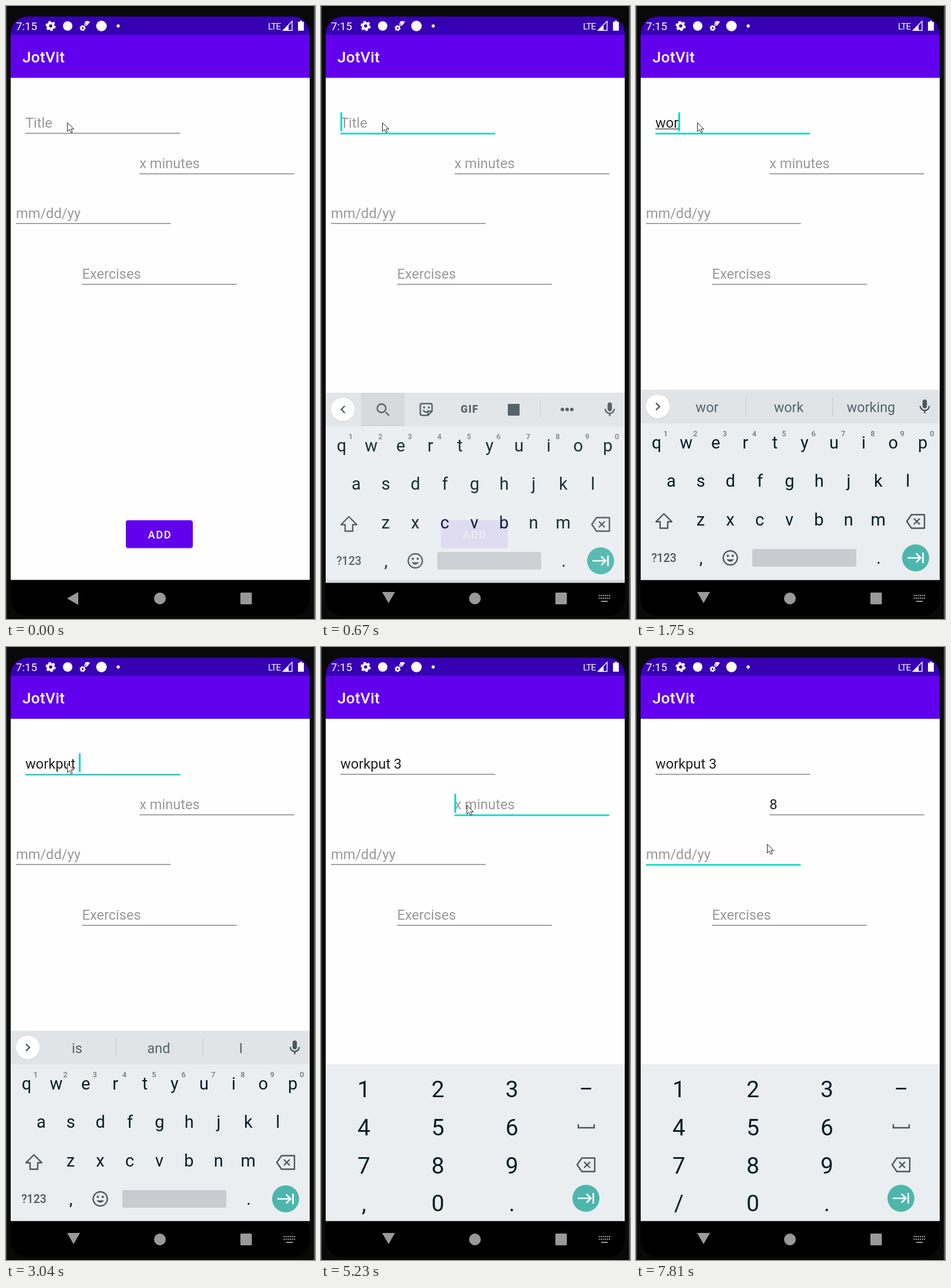
Animation of 526x1043 px, one loop 8000 ms. Source, as an HTML page:

```html
<!DOCTYPE html>
<html lang="en">
<head>
<meta charset="utf-8">
<title>Workout form</title>
<style>
  html, body { margin: 0; width: 526px; height: 1043px; overflow: hidden; background: #090909; }
  svg { display: block; font-family: Roboto, sans-serif; }
  text { white-space: pre; }
  .mid { text-anchor: middle; }
  .line { fill: none; stroke: #48575f; stroke-width: 2.4; }
</style>
</head>
<body>
<svg id="stage" width="526" height="1043" viewBox="0 0 526 1043"></svg>
<script>
const LOOP = 8000;
const FIELD_SIZE = 23.6;
const ACCENT = '#03dac5', INK = '#212121', HINT = '#999', KEY = '#051e28', ICON = '#48575f';
const stage = document.getElementById('stage');
const $ = id => document.getElementById(id);

// Markup helpers
const rect = (x, y, w, h, fill, more = '') =>
  `<rect x="${x}" y="${y}" width="${w}" height="${h}" fill="${fill}" ${more}/>`;
const disc = (x, y, r, fill, more = '') => `<circle cx="${x}" cy="${y}" r="${r}" fill="${fill}" ${more}/>`;
const path = (d, more = 'class="line"') => `<path d="${d}" ${more}/>`;
const text = (x, y, size, fill, str, more = '') =>
  `<text x="${x}" y="${y}" font-size="${size}" fill="${fill}" ${more}>${str}</text>`;
const label = (x, y, size, fill, str, more = '') => text(x, y, size, fill, str, `class="mid" ${more}`);
const at = (x, y, body) => `<g transform="translate(${x} ${y})">${body}</g>`;
const group = (id, body) => `<g id="${id}">${body}</g>`;

const gear = (x, y, r) =>
  `<g fill="none" stroke="#fff"><circle cx="${x}" cy="${y}" r="${r * .56}" stroke-width="${r * .48}"/>` +
  `<circle cx="${x}" cy="${y}" r="${r * .86}" stroke-width="${r * .3}" pathLength="12" stroke-dasharray="1.1 .9"/></g>`;

const backspace = (x, y) => at(x, y, path('M-15 0L-7-11.5H15V11.5H-7Z M-3-5L7 5M7-5L-3 5', 'class="line" stroke-linejoin="round"'));
const enter = (x, y) => at(x, y, disc(0, 0, 23, '#4db6ac') +
  path('M-14 0H8M1-7.5L8.5 0L1 7.5M12.5-9V9', 'fill="none" stroke="#fff" stroke-width="2.7"'));
const mic = at(491.5, 681.5,
  rect(-3.7, -12, 7.4, 15, ICON, 'rx="3.7"') + path('M-7.7-1a7.7 7.7 0 0 0 15.4 0M0 6.5V11.5'));

const fields = [
  { x: 33, y: 216.5, hint: 'Title' },
  { x: 227.2, y: 285.5, hint: 'x minutes' },
  { x: 17, y: 370, hint: 'mm/dd/yy' },
  { x: 129.5, y: 473.5, hint: 'Exercises' },
];

function statusBar() {
  return rect(8, 18, 509, 31.5, '#3700b3') +
    text(17, 41, 18.6, '#fff', '7:15') + gear(76, 34, 8.5) + disc(105, 34, 8, '#fff') +
    gear(130.5, 37.5, 5) + gear(136, 31, 3) + path('M134 27Q138.500 24 143 27L138.500 33Z', 'fill="#fff"') +
    disc(162.5, 34, 9, '#fff') + disc(191, 34, 2.7, '#fff') +
    text(446, 39.5, 15.5, '#fff', 'LTE', 'letter-spacing="-1"') +
    path('M487 26V41.500H471.500Z', 'fill="none" stroke="#fff" stroke-width="1.4"') +
    path('M481 32V41.500H471.500Z', 'fill="#fff"') +
    path('M500 25h4v2h3v15h-10v-15h3z', 'fill="#fff"');
}

function formField(f, i) {
  return text(f.x, f.y - 9.5, FIELD_SIZE, HINT, f.hint, `id="value${i}"`) +
    rect(f.x, f.y - .6, 263.5, 1.3, '#757575', `id="rule${i}"`);
}

function letterRow(letters, x, y) {
  return [...letters].map((c, i) => label(x + i * 50.35, y, 29, KEY, c)).join('');
}

function letterKeyboard() {
  const digits = [...'1234567890']
    .map((c, i) => label(50.5 + i * 50.35, 732, 13, '#6f7a80', c, 'font-weight="500"')).join('');
  const tools = rect(68, 653, 74, 57, '#d3d7d9', 'id="pressed"') +
    path('M110 686L116 692', 'class="line" stroke-width="3"') + disc(103, 679.5, 7.3, 'none', 'class="line"') +
    at(179, 681.5, path('M-7-10H7Q10-10 10-7V3L3 10H-7Q-10 10-10 7V-7Q-10-10-7-10ZM3 10V3H10M-5 1Q-2 6 3 4') +
      rect(-5, -5, 3, 3, ICON) + rect(3, -5, 3, 3, ICON)) +
    label(253, 687, 17.5, ICON, 'GIF', 'font-weight="900" letter-spacing="1.2"') +
    rect(318, 672, 20, 20, ICON, 'rx="1"') + rect(372.5, 666, 1, 30, '#c5cacd') +
    [411, 419, 427].map(x => disc(x, 681.5, 3, ICON)).join('');
  const words = rect(186.5, 666, 1, 31, '#bfc5c8') + rect(334.5, 666, 1, 31, '#bfc5c8') +
    [121, 260, 400].map((x, i) => label(x, 691, 23.4, '#55636a', '', `id="word${i}"`)).join('');
  return rect(8, 653, 509, 57.5, '#e0e4e7') + rect(8, 710, 509, 266.5, '#eaeef1') +
    group('tools', tools) + group('words', words) + mic +
    disc(37, 682.5, 20, '#c6cacd') + disc(37, 681.5, 20, '#fff') + path('', 'id="chevron" class="line"') +
    letterRow('qwertyuiop', 35, 753) + digits + letterRow('asdfghjkl', 60, 818) + letterRow('zxcvbnm', 110, 884) +
    path('M47.500 864L61 877.500H54V888.500H41V877.500H34Z', 'class="line" stroke-linejoin="round"') + backspace(476, 877) +
    label(47.5, 946, 19.5, ICON, '?123', 'font-weight="500"') + label(110.5, 949, 29, KEY, ',') +
    at(160.5, 939, disc(0, 0, 12, 'none', 'class="line"') + disc(-4.2, -3.5, 1.9, ICON) + disc(4.2, -3.5, 1.9, ICON) +
      path('M-6.500 2.500Q0 10.500 6.500 2.500Z', `fill="${ICON}"`)) +
    rect(198, 924, 177, 30, '#c8ccd0', 'rx="3"') + label(413, 949, 29, KEY, '.') + enter(476, 939);
}

function numberKeyboard() {
  const keys = ['123', '456', '789', ',0.'].map((row, r) => [...row].map((c, i) =>
    label(73 + i * 126, 766 + r * 64.8, 39, KEY, c, c === ',' ? 'id="corner"' : '')).join('')).join('');
  return rect(8, 710, 509, 266.5, '#eaeef1') + keys + rect(442.5, 750, 17.5, 2.8, KEY) +
    path('M438 812V818H465V812') + backspace(451, 881) + enter(451, 938);
}

function navBar() {
  let dots = rect(477, 1012, 11, 2, '#999');
  for (let i = 0; i < 12; i++) dots += rect(472.5 + i % 6 * 3.5, 1002 + (i / 6 | 0) * 4.5, 2.2, 2.2, '#999');
  return path('', 'id="back" fill="#999"') + disc(262, 1008, 10, '#999') +
    rect(399, 998, 19.5, 20, '#999', 'rx="1.5"') + group('keysIcon', dots);
}

stage.innerHTML =
  '<defs><clipPath id="screen"><rect x="8" y="18" width="509" height="1020" rx="29"/></clipPath></defs>' +
  rect(0, 0, 526, 1043, '#090909') + rect(0, 0, 1.6, 1043, '#414141') + rect(524, 0, 2, 1043, '#505050') +
  '<g clip-path="url(#screen)">' +
  rect(8, 18, 509, 1020, '#000') + rect(8, 122, 509, 854.5, '#fefefe') + statusBar() +
  rect(8, 122, 509, 1, '#ccc') + rect(8, 49, 509, 73, '#6200ee') +
  text(28, 96, 26.1, '#fff', 'JotVit', 'font-weight="500" letter-spacing=".33"') +
  fields.map(formField).join('') +
  rect(0, 0, 0, 1.2, INK, 'id="composing"') + rect(0, 0, 3, 32, ACCENT, 'id="caret"') +
  rect(204, 877, 114, 47, '#000', 'rx="4" opacity=".2"') + rect(204, 875, 114, 47, '#6200ee', 'rx="4"') +
  label(262, 906, 18.3, '#fff', 'ADD', 'font-weight="500" letter-spacing="1.6"') +
  group('letters', letterKeyboard()) + group('numbers', numberKeyboard()) + navBar() + '</g>' +
  group('pointer', path('M.5.5V15.500L4 12.200L6.500 17.500L9 16.400L6.600 11.300H11.500Z',
    'fill="#fff" stroke="#222" stroke-width="1"'));

// Each step changes some properties and keeps the rest.
const base = { focus: -1, caret: 0, title: '', minutes: '', words: null, keyboard: '', shift: 0, alpha: 1,
  pressed: 0, typing: 0, hold: -1, corner: ',', pointer: [104, 198] };
const glide = k => [Math.round(104 + 144 * k), Math.round(198 + 71 * k)];
const steps = [
  [0, {}],
  [400, { focus: 0, caret: 1 }],
  [550, { keyboard: 'letters', shift: 12, alpha: .35, pressed: 1 }],
  [670, { shift: 5, alpha: .92 }],
  [790, { shift: 0, alpha: 1 }],
  [920, { caret: 0, pressed: 0 }],
  [1450, { caret: 1 }],
  [1600, { title: 'wo', typing: 1, words: ['wo', 'would', 'work'] }],
  [1750, { title: 'wor', words: ['wor', 'work', 'working'] }],
  [2150, { title: 'work', words: ['work', 'working', 'works'] }],
  [2300, { title: 'workp', words: ['workp', 'workout', 'workplace'] }],
  [2760, { title: 'workput', words: ['workput', 'workout', 'workouts'] }],
  [3040, { title: 'workput ', typing: 0, words: ['is', 'and', 'I'] }],
  [3600, { title: 'workput 3', words: null }],
  [4000, { pointer: glide(.1) }],
  [4120, { pointer: glide(.4), caret: 0 }],
  [4240, { pointer: glide(.72) }],
  [4370, { pointer: glide(.93) }],
  [4490, { pointer: glide(1), caret: 1 }],
  [5080, { focus: 1 }],
  [5230, { keyboard: 'numbers' }],
  [5600, { caret: 0 }],
  [6130, { minutes: '8', caret: 1 }],
  [6690, { pointer: [229, 302], caret: 0 }],
  [6840, { pointer: [223, 335] }],
  [7110, { caret: 1 }],
  [7260, { hold: 2 }],
  [7410, { focus: 2, hold: -1, corner: '/' }],
  [7810, { caret: 0 }],
];

const pen = document.createElement('canvas').getContext('2d');
function textWidth(str) {
  pen.font = `${FIELD_SIZE}px Roboto, sans-serif`;
  return pen.measureText(str).width;
}
const set = (id, attrs) => { for (const k in attrs) $(id).setAttribute(k, attrs[k]); };
const show = (id, on) => set(id, { display: on ? 'inline' : 'none' });

function render(t) {
  const s = Object.assign({}, base, ...steps.filter(([from]) => from <= t).map(step => step[1]));
  const values = [s.title, s.minutes, '', ''];

  fields.forEach((f, i) => {
    const active = i === s.focus || i === s.hold;
    $('value' + i).textContent = values[i] || f.hint;
    set('value' + i, { fill: values[i] ? INK : i === s.hold ? '#757575' : HINT });
    set('rule' + i, { height: active ? 2.6 : 1.3, fill: active ? ACCENT : '#757575' });
  });

  show('caret', s.caret);
  if (s.caret) {
    const f = fields[s.focus];
    set('caret', { x: Math.round(f.x + textWidth(values[s.focus])), y: Math.round(f.y - 35.5) });
  }
  set('composing', { x: 33, y: 208.6, width: s.typing ? textWidth(s.title) : 0 });

  show('letters', s.keyboard === 'letters');
  show('numbers', s.keyboard === 'numbers');
  set('letters', { transform: `translate(0 ${s.shift})`, opacity: s.alpha });
  show('pressed', s.pressed);
  show('tools', !s.words);
  show('words', s.words);
  (s.words || []).forEach((word, i) => { $('word' + i).textContent = word; });
  set('chevron', { d: s.words ? 'M34 675.500L40 681.500L34 687.500' : 'M40.500 675.500L34.500 681.500L40.500 687.500' });
  $('corner').textContent = s.corner;

  show('keysIcon', s.keyboard);
  set('back', { d: s.keyboard ? 'M104 997H126L115 1016Z' : 'M104 1008L123 997V1019Z' });
  set('pointer', { transform: `translate(${s.pointer})` });
}

const start = performance.now();
function tick() {
  render((performance.now() - start) % LOOP);
  requestAnimationFrame(tick);
}
tick();
</script>
</body>
</html>
```
